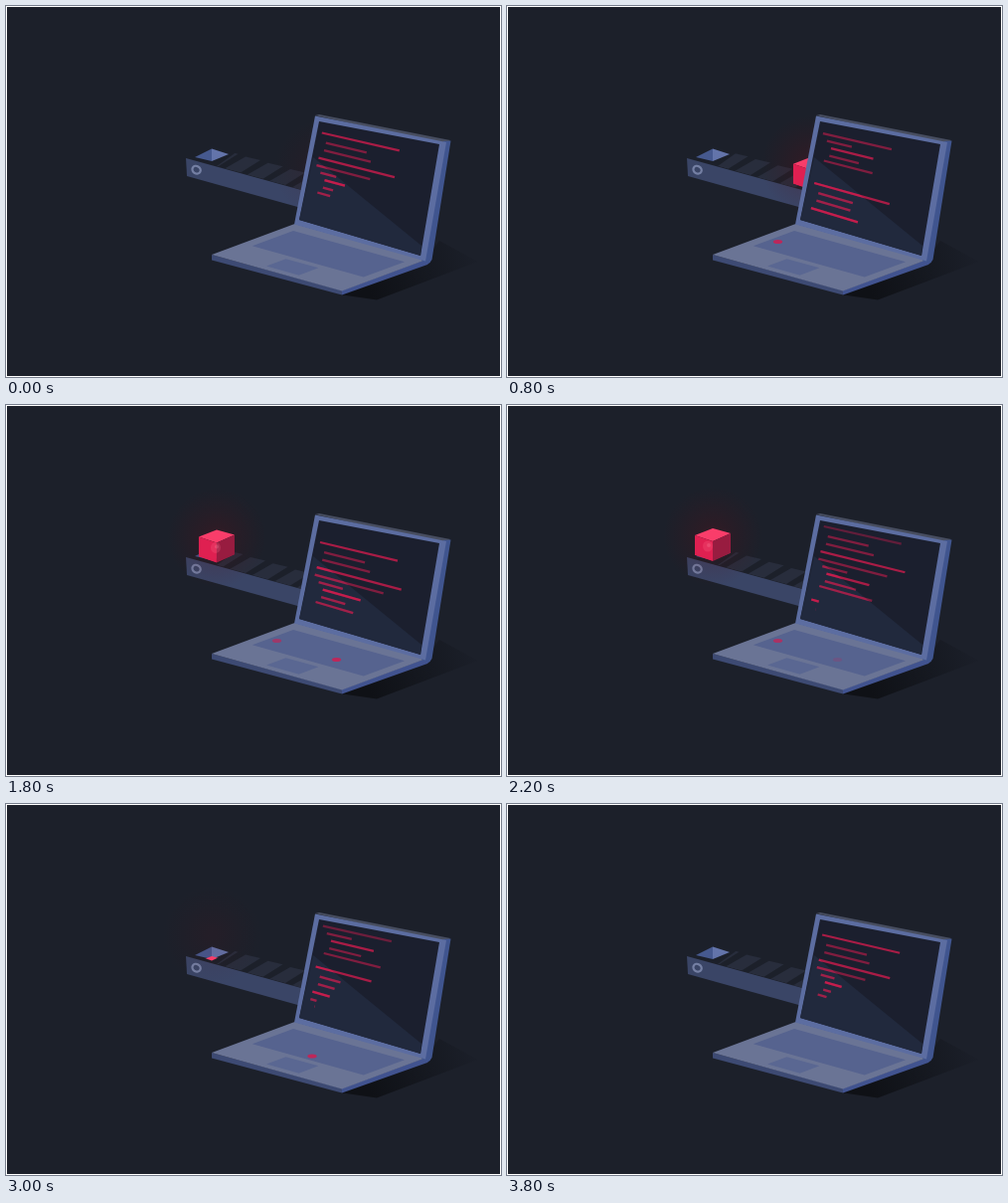
These frames come from a looping animation (498x373 px, 3900 ms). An HTML page with a canvas:

```html
<!DOCTYPE html>
<html lang="en">
<head>
<meta charset="utf-8">
<title>Laptop and conveyor</title>
<style>
html, body { margin: 0; width: 100%; height: 100%; overflow: hidden; background: #1c202a; }
canvas { display: block; }
</style>
</head>
<body>
<canvas id="stage" width="498" height="373"></canvas>
<script>
const ctx = document.getElementById('stage').getContext('2d');
const LOOP = 3900, STEP = 100;
const SCROLL = .04;          // code speed, px per ms
const STRIPE_GAP = 22.5;
const SLOPE = .28;           // conveyor drop per px
const LINE_WIDTHS = [78, 41, 48, 85, 69, 25, 43, 32, 57];
const SCREEN = [315, 116, 436, 139, 417, 251, 295, 215];
const SHINE = [309, 152, 418, 241, 417, 251, 295, 215];

const clamp = v => Math.min(1, Math.max(0, v));
const smooth = v => (v = clamp(v), v * v * (3 - 2 * v));
const sine = v => (1 - Math.cos(Math.PI * clamp(v))) / 2;

function path(p) {
  ctx.beginPath();
  for (let i = 0; i < p.length; i += 2) ctx.lineTo(p[i], p[i + 1]);
  ctx.closePath();
}
function poly(color, ...p) {
  ctx.fillStyle = color;
  path(p);
  ctx.fill();
}
function ellipse(color, x, y, rx, ry) {
  ctx.fillStyle = color;
  ctx.beginPath();
  ctx.ellipse(x, y, rx, ry, 0, 0, 7);
  ctx.fill();
}
function clipped(p, draw) {
  ctx.save();
  path(p);
  ctx.clip();
  draw();
  ctx.restore();
}

function drawConveyor(travel) {
  clipped([212, 161, 233, 146, 312, 168, 298, 185], () => {
    for (let d = travel % STRIPE_GAP - STRIPE_GAP; d < 100; d += STRIPE_GAP) {
      const x = 220 + d, y = 163.5 + d * SLOPE;
      poly('#282d3c', x, y, x + 21, y - 12, x + 36, y - 8.5, x + 16, y + 4);
    }
  });
  poly('#3a4566', 181, 153, 297, 185, 297, 203, 182, 171);
  poly('#46598f', 190, 152, 207, 143.5, 207, 156);
  poly('#6374aa', 207, 143.5, 224, 149, 207, 156);
  ctx.strokeStyle = '#7580a4';
  ctx.lineWidth = 2.2;
  ctx.beginPath();
  ctx.ellipse(191.6, 164.7, 4.3, 3.7, .5, 0, 7);
  ctx.stroke();
}

function drawCube(t, travel) {
  const sink = 34 * sine((t - 2400) / 800);
  const x = 207 + travel, y = 137 + travel * SLOPE + sink;

  const glow = t > 2400 ? 1 - clamp((t - 2400) / 1000) : .5 + .5 * clamp(t / 700);
  const gy = y - sink - 5;
  const halo = ctx.createRadialGradient(x, gy, 5, x, gy, 50);
  halo.addColorStop(0, `rgba(100,14,24,${.27 * glow})`);
  halo.addColorStop(1, 'rgba(80,14,22,0)');
  ellipse(halo, x, gy, 50, 50);

  // The sinking part is cut off by the front rim of the hole
  clipped([x - 90, 60, x + 90, 60, x + 18, y - sink + 12, x, y - sink + 20.5, x - 18, y - sink + 14], () => {
    poly('#f93d6a', x - 18, y - 6, x, y - 13, x + 18, y - 8, x, y);
    poly('#df2051', x - 18, y - 6, x, y, x, y + 20, x - 18, y + 14);
    poly('#981c40', x, y, x + 18, y - 8, x + 18, y + 12, x, y + 20);
    const spot = x + 5 - clamp((t - 1200) / 1000) * 10;
    ellipse('rgba(255,110,140,.22)', spot, y + 5, 5, 5.5);
    ellipse('rgba(255,140,165,.25)', spot + 1, y + 4, 2, 2);
  });
}

// One block of code scrolls up while its lines are typed one after another
function drawBlock(top, clock, strength) {
  LINE_WIDTHS.forEach((full, i) => {
    const dy = 7.5 * i + (i % 8 ? 2.6 : 0), y = top + dy;
    const x = 316 + 4.5 * Math.sin(1.25 * i) - .25 * i + (138 - top) * .17;
    const w = full * smooth((clock - 1865 - dy / SCROLL) / 1750) * clamp((208 - y) / 3);
    ctx.globalAlpha = strength * (i % 3 ? .5 : .7) * clamp((y - 121) / 2);
    ctx.beginPath();
    ctx.moveTo(x, y);
    ctx.lineTo(x + w, y + w * (.225 + (y - 122) * .00095));
    if (w > 0) ctx.stroke();
  });
}

function drawCode(t, strength) {
  ctx.strokeStyle = '#e51c50';
  ctx.lineWidth = 2.3;
  for (const [base, lead] of [[283.5, 0], [315.2, 2630]]) {
    const clock = (t + lead) % LOOP;
    for (const c of [clock, clock + LOOP]) drawBlock(base - SCROLL * c, c, strength);
  }
  ctx.globalAlpha = 1;
}

// Parallelogram on the laptop's keyboard deck, in fractions of its sides
function deck(color, u0, v0, u1, v1) {
  const at = (u, v) => [207 + 131 * u + 83.5 * v, 250 + 36.5 * u - 31 * v];
  poly(color, ...at(u0, v0), ...at(u0, v1), ...at(u1, v1), ...at(u1, v0));
}

function flashKey(t, x, y, peak) {
  ctx.globalAlpha = .85 * Math.cos(clamp(Math.abs(t - peak) / 435) * Math.PI / 2);
  ellipse('#d01c50', x, y, 4.6, 2.1);
  ctx.globalAlpha = 1;
}

function drawLaptop(t) {
  const shade = ctx.createLinearGradient(365, 285, 472, 252);
  shade.addColorStop(0, '#0f1116');
  shade.addColorStop(1, '#1b1f29');
  poly(shade, 335, 290, 373, 295.5, 475, 257, 436, 236, 420, 256);

  poly('#3d4a73', 207, 250, 338, 286, 338, 290.5, 207, 255.5);
  poly('#41538f', 338, 286, 422, 255, 427, 257, 424, 260, 338, 290.5);
  deck('#6a7495', 0, 0, 1, 1);
  deck('#56638f', .075, .37, .93, .865);
  deck('#5a6792', .375, .07, .625, .305);
  flashKey(t, 272.5, 237, 850);
  flashKey(t, 332.5, 256, 1825);
  flashKey(t, 272.5, 237, 2025);
  flashKey(t, 308, 253.5, 3000);

  poly('#474d5f', 311, 110, 315, 109, 447, 135, 442, 139);
  poly('#40558f', 440, 136, 447.5, 135.5, 428.5, 255, 426, 258.5, 418, 256);
  poly('#5c6da1', 311, 110.5, 443, 137, 422, 256.5, 290, 219.5);
  poly('#1b1f2e', ...SCREEN);
  poly('#21293d', ...SHINE);
  clipped(SCREEN, () => {
    drawCode(t, 1);
    clipped(SHINE, () => drawCode(t, .6));
  });
}

function draw(t) {
  ctx.fillStyle = '#fff';
  ctx.fillRect(0, 0, 498, 373);
  ctx.fillStyle = '#1c202a';
  ctx.fillRect(1, 1, 496, 371);
  const travel = 5 * STRIPE_GAP * (1 - sine(clamp((t - 600) / 1455) ** .75));
  drawConveyor(travel);
  if (t < 3400) drawCube(t, travel);
  drawLaptop(t);
}

function tick() {
  draw(Math.floor(performance.now() % LOOP / STEP) * STEP);
  requestAnimationFrame(tick);
}
tick();
</script>
</body>
</html>
```
